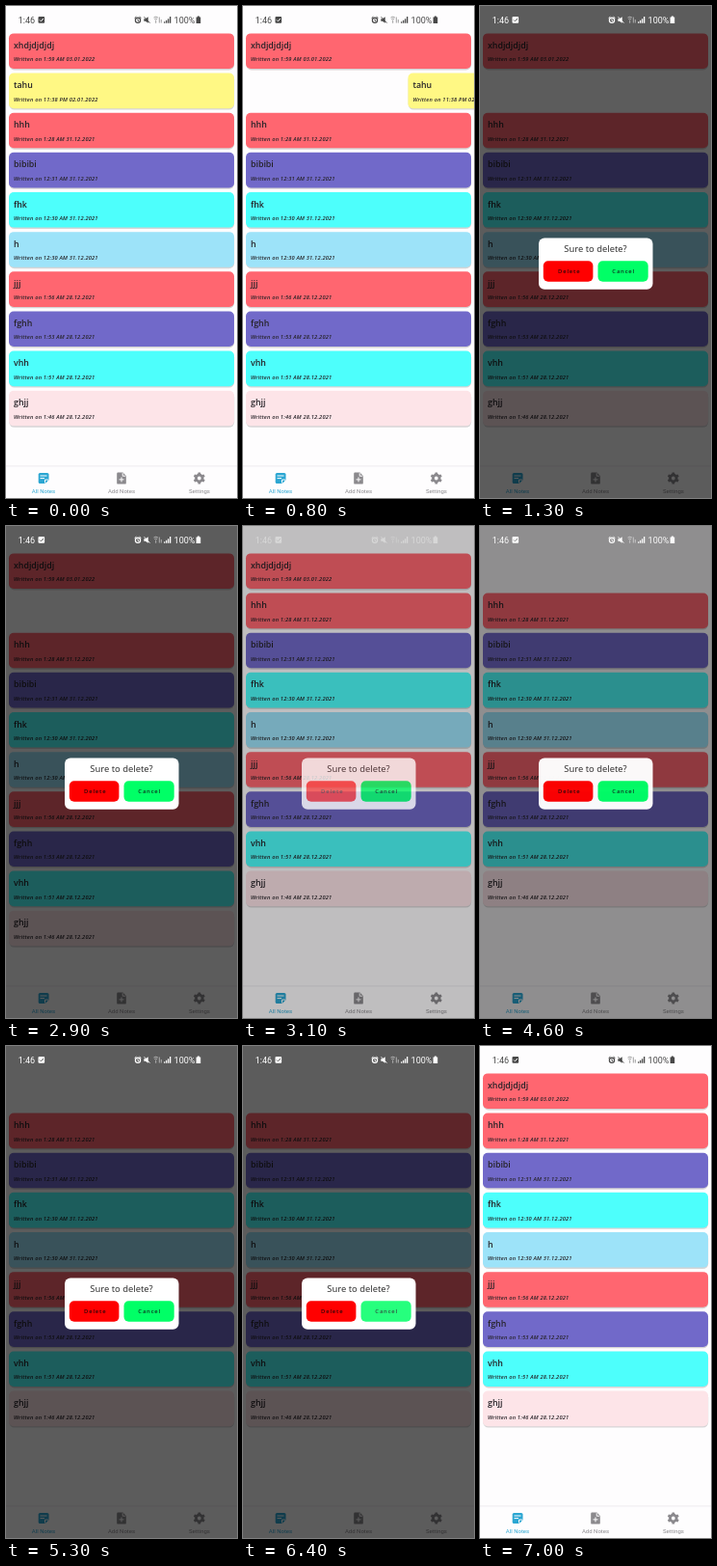
An HTML page for the animation above (7.1 s loop, 240 by 510 pixels).

```html
<!DOCTYPE html>
<html lang="en">
<head>
<meta charset="utf-8">
<title>Notes</title>
<style>
html, body { margin: 0; width: 100%; height: 100%; overflow: hidden; background: #fefdfe; }
svg { display: block; width: 240px; height: 510px; }
.title { font: 600 8.8px "Open Sans", sans-serif; }
.date { font: italic 600 5.7px "Open Sans", sans-serif; letter-spacing: .18px; }
.bar { font: 9px Roboto, sans-serif; }
.tab { font: 6px Roboto, sans-serif; text-anchor: middle; }
.ask { font: 9.4px "Noto Sans", sans-serif; text-anchor: middle; }
.btn { font: 600 5.9px "Open Sans", sans-serif; letter-spacing: .8px; text-anchor: middle; }
.hole { fill: none; stroke: #fefdfe; }
#active { fill: #2ba6d2; }
#idle { fill: #8b898d; }
</style>
</head>
<body>
<svg viewBox="0 0 240 510">
  <rect width="240" height="510" fill="#fefdfe"/>
  <g id="list" fill="#262328"></g>

  <rect y="477" width="240" height="33" fill="#fefdfe"/>
  <rect y="476.6" width="240" height=".7" fill="#e4e2e6"/>
  <g id="active">
    <path d="M35.3 484h7.6q1.6 0 1.6 1.6v5.6l-3.8 3.8h-5.4q-1.6 0-1.6-1.6v-7.8q0-1.6 1.6-1.6z"/>
    <path class="hole" d="M35.5 487h7M35.5 489.6h4.5M40.5 494.5v-3.4h3.6"/>
    <text class="tab" x="39" y="505">All Notes</text>
  </g>
  <g id="idle">
    <path d="M116.4 483.6h5l3.4 3.4v7.4q0 1.2-1.2 1.2h-7.2q-1.2 0-1.2-1.2v-9.6q0-1.2 1.2-1.2z"/>
    <path class="hole" d="M120 488.4v5M117.5 490.9h5M121.2 484.2v3h3"/>
    <text class="tab" x="120" y="505">Add Notes</text>
    <circle cx="200.8" cy="489.5" r="3.3" fill="none" stroke="#8b898d" stroke-width="2.8"/>
    <g id="teeth"></g>
    <text class="tab" x="201" y="505">Settings</text>
  </g>

  <rect id="shade" width="240" height="510"/>

  <g id="status">
    <text class="bar" x="12.7" y="18">1:46</text>
    <rect x="33.5" y="11" width="6.6" height="6.8" rx="1"/>
    <path id="check" d="M35 14.4l1.4 1.4 2.4-2.8" fill="none"/>
    <g fill="none" stroke="currentColor" stroke-width="1.2">
      <circle cx="137" cy="14.8" r="2.6"/>
      <path d="M133.6 12.6l1.8-1.5M140.4 12.6l-1.8-1.5M137 13.3v1.7l1.2.7" stroke-width="1"/>
      <path d="M143.5 11.2l6 6.4" stroke-width=".9"/>
    </g>
    <path d="M143.3 13.2h1.7l2.7-2v6.5l-2.7-2h-1.7z"/>
    <g opacity=".65" fill="none" stroke="currentColor" stroke-width=".8">
      <path d="M153.5 12q2.2-1.6 4.4 0M154.3 13.6q1.4-1 2.8 0M155.7 14.5v3.3M159.3 11.5v6M161.3 14v3.5"/>
    </g>
    <path d="M164 16.2h1.3v1.6H164zM166 14.8h1.3v3H166zM168 13.2h1.3v4.6H168zM170 11h1.3v6.8H170z"/>
    <text class="bar" x="174.6" y="18">100%</text>
    <path d="M198.9 10.6h2v1h1.3v6.3h-4.6v-6.3h1.3z"/>
  </g>

  <g id="modal">
    <rect x="61" y="240.5" width="118.5" height="53.3" rx="6" fill="#fff"/>
    <text class="ask" x="120" y="255" fill="#333">Sure to delete?</text>
    <g id="del">
      <rect x="65.8" y="264.2" width="51.6" height="21.6" rx="5" fill="#f00"/>
      <text class="btn" x="92.7" y="277.2" fill="#2b0508">Delete</text>
    </g>
    <g id="cancel">
      <rect x="122.5" y="264.2" width="52.2" height="21.6" rx="5" fill="#00ff66"/>
      <text class="btn" x="149.2" y="277.2" fill="#0c3020">Cancel</text>
    </g>
  </g>
</svg>
<script>
const LOOP = 7100, TOP = 28.4, PITCH = 41.15, SHADE = .635;
const $ = id => document.getElementById(id);
const ramp = (t, a, b) => Math.min(1, Math.max(0, (t - a) / (b - a)));
const smooth = x => x * x * (3 - 2 * x);
const mix = (a, b, k) => Math.round(a + (b - a) * k);
const gray = v => `rgb(${v},${v},${v})`;

const fills = {
  red: "#ff6670", yellow: "#fff884", purple: "#7169c9",
  cyan: "#4dfffc", sky: "#9de3f9", pink: "#fde4e8"
};
const notes = [
  ["xhdjdjdjdj", "1:59 AM 03.01.2022", "red"],
  ["tahu", "11:38 PM 02.01.2022", "yellow"],
  ["hhh", "1:28 AM 31.12.2021", "red"],
  ["bibibi", "12:31 AM 31.12.2021", "purple"],
  ["fhk", "12:30 AM 31.12.2021", "cyan"],
  ["h", "12:30 AM 31.12.2021", "sky"],
  ["jjj", "1:56 AM 28.12.2021", "red"],
  ["fghh", "1:53 AM 28.12.2021", "purple"],
  ["vhh", "1:51 AM 28.12.2021", "cyan"],
  ["ghjj", "1:46 AM 28.12.2021", "pink"]
];
$("list").innerHTML = notes.map(([name, date, color]) => `<g>
  <rect x="3.2" y="1.2" width="234" height="36.8" rx="5.5" fill="#000" opacity=".16"/>
  <rect x="3" width="234" height="36.6" rx="5" fill="${fills[color]}"/>
  <text class="title" x="8" y="15.5">${name}</text>
  <text class="date" x="8" y="29">Written on ${date}</text></g>`).join("");
const cards = [...$("list").children];

$("teeth").innerHTML = Array.from({ length: 6 }, (_, i) =>
  `<rect x="199.4" y="483.4" width="2.8" height="3" rx=".5" transform="rotate(${i * 60} 200.8 489.5)"/>`).join("");

function draw(t) {
  const dim = ramp(t, 1000, 1300) - ramp(t, 2950, 3200)
            + ramp(t, 4400, 4690) - ramp(t, 6420, 6700);
  const shown = 1 - (1 - dim) ** 3; // the dialog appears ahead of the shade
  const removed = t >= 3100;
  const slides = [
    smooth(ramp(t, 4000, 4400)) - smooth(ramp(t, 6450, 6750)),
    smooth(ramp(t, 450, 1000))
  ];

  cards.forEach((card, i) => {
    const row = removed && i > 1 ? i - 1 : i;
    const x = 240 * (slides[i] || 0);
    card.setAttribute("transform", `translate(${x} ${TOP + row * PITCH})`);
    card.setAttribute("visibility", x >= 239 || (removed && i === 1) ? "hidden" : "visible");
  });

  $("shade").setAttribute("opacity", SHADE * dim);
  const ink = gray(mix(72, 255, shown));
  $("status").setAttribute("fill", ink);
  $("status").setAttribute("color", ink);
  $("check").setAttribute("stroke", gray(mix(254, 254 * (1 - SHADE), dim)));

  $("modal").setAttribute("opacity", shown);
  $("del").setAttribute("opacity", 1 - .3 * (ramp(t, 2900, 3000) - ramp(t, 3200, 3300)));
  $("cancel").setAttribute("opacity", 1 - .3 * (ramp(t, 6350, 6450) - ramp(t, 6700, 6800)));
}

const start = performance.now();
function tick() {
  draw((performance.now() - start) % LOOP);
  requestAnimationFrame(tick);
}
tick();
</script>
</body>
</html>
```
